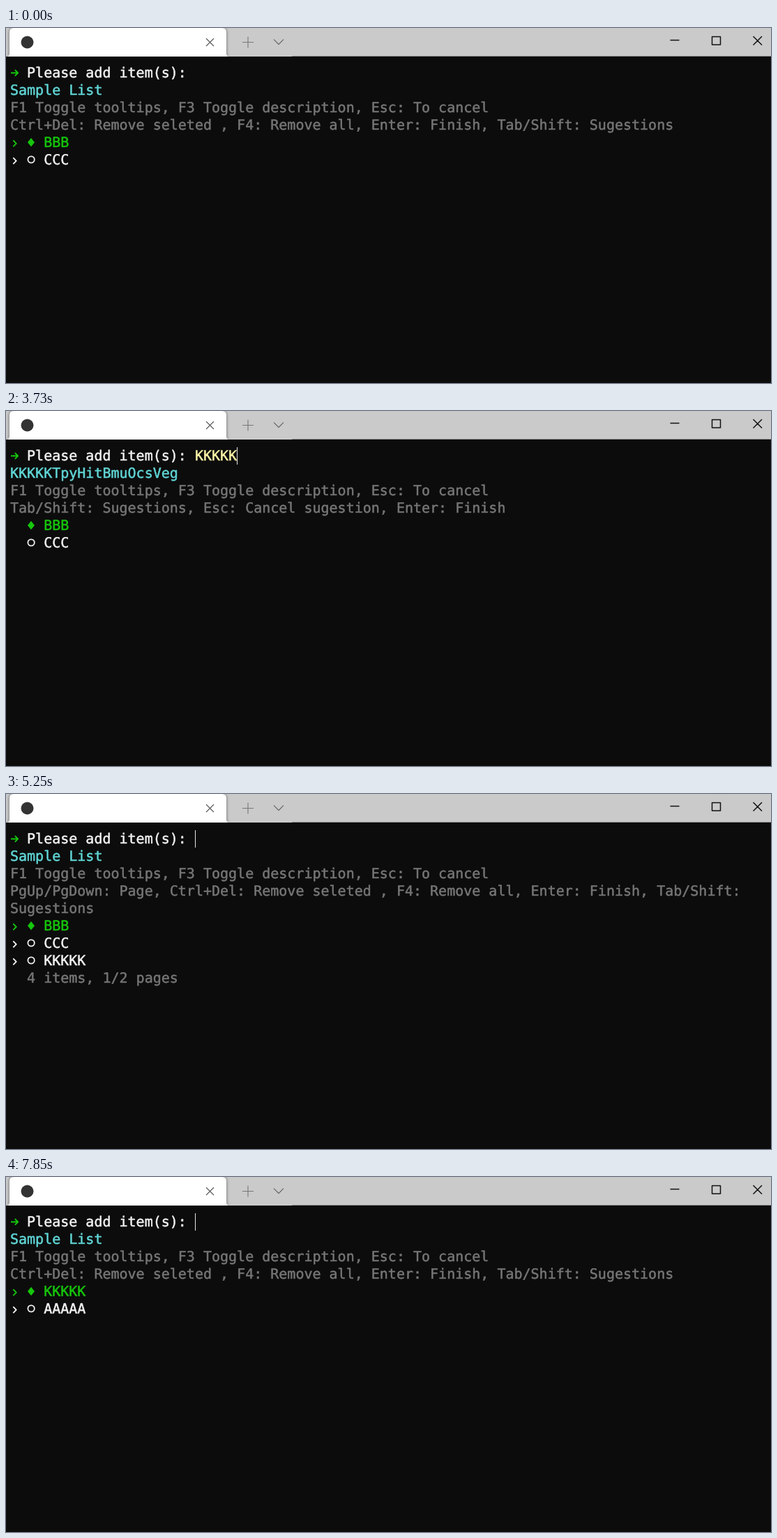
An HTML page with a canvas for the animation above (8 s loop, 1097 by 510 pixels).

```html
<!DOCTYPE html>
<html lang="en">
<head>
<meta charset="utf-8">
<title>Terminal list prompt</title>
<style>
  html, body { margin: 0; width: 100%; height: 100%; overflow: hidden; background: #0c0c0c; }
  canvas { display: block; }
</style>
</head>
<body>
<canvas id="stage" width="1097" height="510"></canvas>
<script>
const ctx = document.getElementById('stage').getContext('2d');
const LOOP = 8000, LEFT = 6, TOP = 52, ROW = 25, CELL = 12.04, BASELINE = 19;
const WHITE = '#f2f2f2', GREEN = '#16c60c', DIM_GREEN = '#11690c',
      CYAN = '#61d6d6', GRAY = '#767676', YELLOW = '#f9f1a5';

const LIST_HELP = ['Ctrl+Del: Remove seleted , F4: Remove all, Enter: Finish, Tab/Shift: Sugestions'];
const PAGED_HELP = ['PgUp/PgDown: Page, Ctrl+Del: Remove seleted , F4: Remove all, Enter: Finish, Tab/Shift:', 'Sugestions'];
const SUGGEST_HELP = ['Tab/Shift: Sugestions, Esc: Cancel sugestion, Enter: Finish'];
const SUGGESTED = 'TpyHitBmuOcsVeg';

const list = (items, extra) => ({ input: '', title: 'Sample List', help: LIST_HELP, items, selected: 0, chevrons: true, ...extra });
const suggest = (input, items) => list(items, { input, title: input + SUGGESTED, help: SUGGEST_HELP, chevrons: false });
const paged = selected => list(['BBB', 'CCC', 'KKKKK'], { selected, help: PAGED_HELP, footer: '4 items, 1/2 pages' });

// Each entry holds from its start time until the next one.
const screens = [
  [0, list(['BBB', 'CCC'])],
  [2460, suggest('KKKKK', ['BBB', 'CCC'])],
  [3930, list(['BBB', 'CCC', 'KKKKK'], { dimmed: true })],
  [4390, suggest('AAAAA', ['BBB', 'CCC', 'KKKKK'])],
  [5250, paged(0)],
  [5910, paged(1)],
  [7050, null],
  [7120, list(['BBB', 'KKKKK', 'AAAAA'])],
  [7850, list(['KKKKK', 'AAAAA'])]
];
const cursorOpacity = [
  [0, 0], [920, 1], [1450, 0], [1980, 1], [3200, 0], [3730, 1], [4390, 0],
  [4460, 1], [5910, 0], [5980, 1], [6650, 0.5], [6720, 0], [7120, 1]
];
const valueAt = (track, time) => track.findLast(([start]) => start <= time)[1];

const columnX = column => LEFT + column * CELL;
const rowY = row => TOP + row * ROW;

function rect(color, x, y, width, height) {
  ctx.fillStyle = color;
  ctx.fillRect(x, y, width, height);
}

function stroke(color, width, path) {
  ctx.strokeStyle = color;
  ctx.lineWidth = width;
  ctx.stroke(new Path2D(path));
}

function disc(color, x, y, radius) {
  ctx.fillStyle = color;
  ctx.beginPath();
  ctx.arc(x, y, radius, 0, 2 * Math.PI);
  ctx.fill();
}

// A hairline outline gives the regular face a medium weight.
function print(text, column, row, color) {
  const x = columnX(column), y = rowY(row) + BASELINE;
  ctx.fillStyle = ctx.strokeStyle = color;
  ctx.lineWidth = 0.5;
  ctx.fillText(text, x, y);
  ctx.strokeText(text, x, y);
}

function drawTab() {
  ctx.save();
  ctx.beginPath();
  ctx.rect(0, 0, 1097, 41);
  ctx.clip();
  ctx.shadowColor = '#0008';
  ctx.shadowBlur = 4;
  ctx.fillStyle = '#fff';
  ctx.fill(new Path2D('M1 41Q5 41 5 36V6Q5 0 11 0H310Q316 0 316 6V36Q316 41 320 41Z'));
  ctx.restore();
}

function drawTitleBar() {
  rect('#cacaca', 0, 0, 1097, 41);
  rect('#8a8a8a', 410, 40, 687, 1);
  drawTab();
  disc('#333', 30.5, 20.5, 9);
  stroke('#555', 1.1, 'M287 15l11 11m0-11l-11 11');
  stroke('#777', 1.1, 'M339 20.5h16m-8-8v16');
  stroke('#666', 1.1, 'M384 16.3l7 7.2 7-7.2');
  stroke('#111', 1.5, 'M952.5 17.5h13M1012.5 12.5h12v11.5h-12zM1071.5 12l12.5 12.5m0-12.5l-12.5 12.5');
}

function drawItem(text, row, selected, chevronColor) {
  const color = selected ? GREEN : WHITE, y = rowY(row);
  if (chevronColor) stroke(chevronColor, 1.9, `M10.3 ${y + 9.3}l4.4 4.5 -4.4 4.5`);
  if (selected) {
    ctx.fillStyle = color;
    ctx.fill(new Path2D(`M36 ${y + 6}l5 6.2 -5 6.2 -5 -6.2z`));
  } else {
    stroke(color, 1.8, `M31.4 ${y + 12}a4.7 4.7 0 1 1 9.4 0a4.7 4.7 0 1 1 -9.4 0z`);
  }
  print(text, 4, row, color);
}

function drawPrompt(screen) {
  stroke(GREEN, 1.9, 'M7 64.5h10m-4.2-4.3l4.3 4.3 -4.3 4.3');
  print('Please add item(s):', 2, 0, WHITE);
  print(screen.input, 22, 0, YELLOW);
  print(screen.title, 0, 1, CYAN);
  print('F1 Toggle tooltips, F3 Toggle description, Esc: To cancel', 0, 2, GRAY);
  let row = 3;
  for (const line of screen.help) print(line, 0, row++, GRAY);
  screen.items.forEach((item, index) => {
    const selected = index === screen.selected;
    const chevron = selected ? (screen.dimmed ? DIM_GREEN : GREEN) : WHITE;
    drawItem(item, row++, selected, screen.chevrons && chevron);
  });
  if (screen.footer) print(screen.footer, 2, row, GRAY);
}

function drawCursor(time, screen) {
  if (time >= 920 && time < 2460) rect('#8b8b8b', 343, TOP, 12, ROW);
  ctx.globalAlpha = valueAt(cursorOpacity, time);
  rect('#e6e6e6', Math.round(columnX(22 + screen.input.length)), TOP, 1, ROW);
  ctx.globalAlpha = 1;
}

function render() {
  const time = performance.now() % LOOP;
  const screen = valueAt(screens, time);
  rect('#0c0c0c', 0, 0, 1097, 510);
  drawTitleBar();
  ctx.font = '20px "DejaVu Sans Mono", monospace';
  ctx.textRendering = 'geometricPrecision';
  ctx.lineJoin = 'round';
  if (screen) {
    drawPrompt(screen);
    drawCursor(time, screen);
  }
  requestAnimationFrame(render);
}
render();
</script>
</body>
</html>
```
